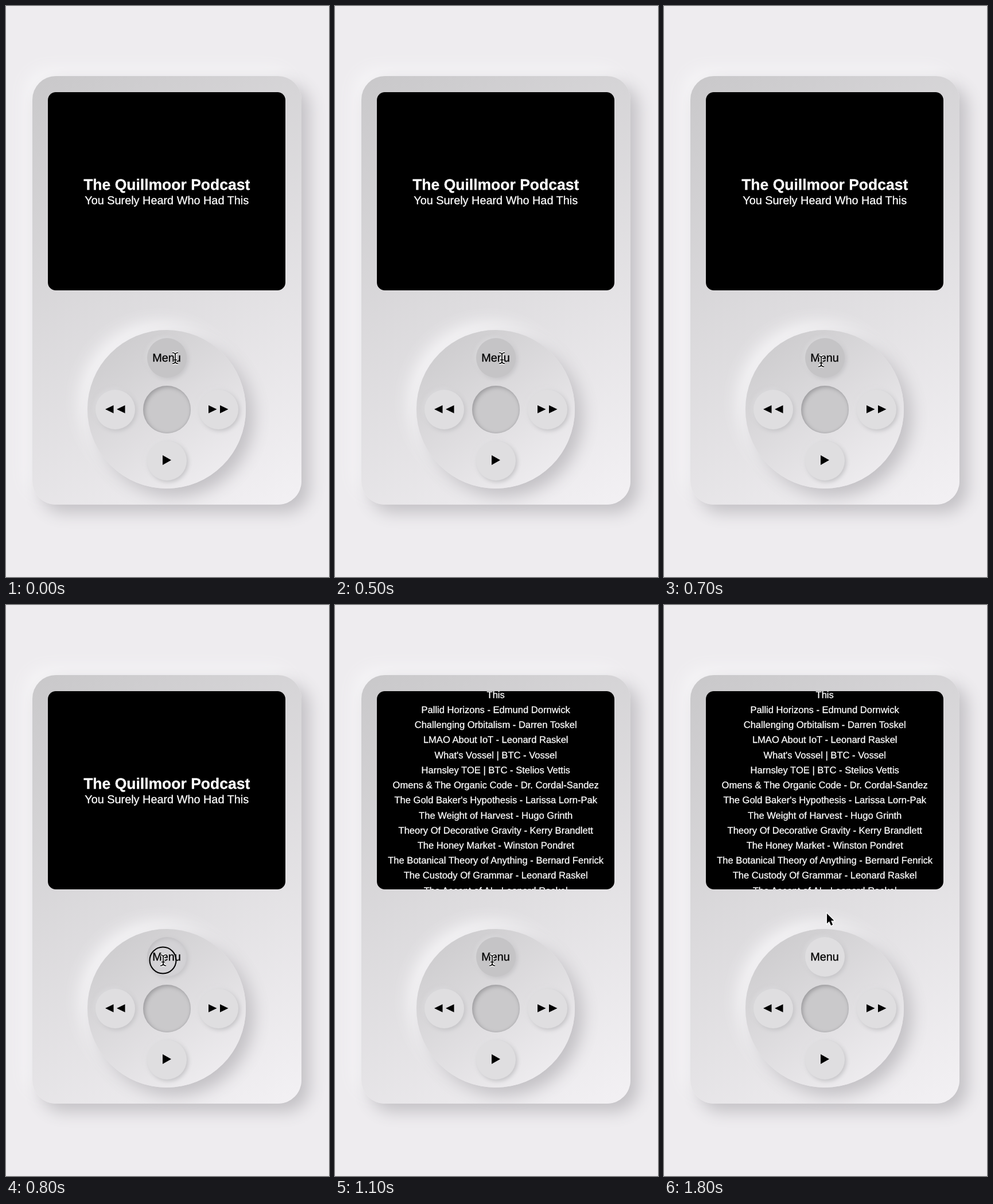
Recreate the animation shown at these times as an HTML page. Size 563 px wide and 994 px high, loop 1900 ms.

```html
<!DOCTYPE html>
<html lang="en">
<head>
<meta charset="utf-8">
<title>Music player</title>
<style>
html, body { margin: 0; width: 100%; height: 100%; overflow: hidden; background: #eeecef; }
div, svg { position: absolute; }
svg { left: 0; top: 0; font-family: "Liberation Sans", Arial, sans-serif; }
text { text-anchor: middle; text-rendering: geometricPrecision; stroke-width: .3px; }
.raised {
  background: linear-gradient(145deg, #c9c8ca, #f3f1f4);
  box-shadow: 13.8px 13.8px 27.6px #c3c1c5, -13.8px -13.8px 27.6px #f5f4f6;
}
#body { left: 46px; top: 122px; width: 469px; height: 746px; border-radius: 41px; }
#screen { left: 73px; top: 150px; width: 414px; height: 345px; border-radius: 13.8px; background: #000; overflow: hidden; }
#screen text { fill: #fff; stroke: #fff; }
#wheel { left: 142px; top: 564px; width: 276px; height: 276px; border-radius: 50%; }
#hub {
  left: 239px; top: 660.5px; width: 83px; height: 83px; border-radius: 50%;
  background: #cac9cb; box-shadow: inset 2.8px 2.8px 7px #9d9c9f, inset -1px -1px 3px #b9b8bb;
}
.key {
  width: 69px; height: 69px; border-radius: 50%; background: #dfdee0;
  box-shadow: 2.8px 2.8px 7px #c6c5c8, -2px -2px 6px #e4e3e580;
}
.key.hover { background: #c5c4c6; }
.key.down { background: #d3d2d5; box-shadow: 2.8px 2.8px 7px #c6c5c8, inset 2.8px 2.8px 7px #c0bfc2; }
</style>
</head>
<body>
<div id="body" class="raised"></div>
<div id="screen">
  <svg width="414" height="345" viewBox="73 150 414 345">
    <g id="title">
      <text x="280.2" y="320" font-size="26.5" font-weight="bold">The Quillmoor Podcast</text>
      <text x="280.2" y="345" font-size="19.87">You Surely Heard Who Had This</text>
    </g>
    <g id="list" font-size="16.56"></g>
  </svg>
</div>
<div id="wheel" class="raised"></div>
<div id="hub"></div>
<div id="menu" class="key" style="left:246px;top:578px"></div>
<div class="key" style="left:156px;top:667.5px"></div>
<div class="key" style="left:335.5px;top:667.5px"></div>
<div class="key" style="left:246px;top:757px"></div>
<svg width="563" height="994">
  <text x="280" y="619" font-size="19.87" stroke="#000">Menu</text>
  <path d="M187.500 695v14l-14.500-7zM207.500 695v14l-14.500-7zM353 695v14l14.500-7zM373 695v14l14.500-7zM273 782v17l15-8.500z"/>
  <circle id="ring" cx="273.500" cy="618.500" r="23" fill="none" stroke="#000" stroke-width="2"/>
  <g id="beam" fill="none">
    <path id="stem" d="M-5-9.500Q-1-9.500 0-6.500Q1-9.500 5-9.500M0-6.500V6.500M-5 9.500Q-1 9.500 0 6.500Q1 9.500 5 9.500M-3 3H3"/>
  </g>
  <path id="arrow" d="M284 537v17.500l4-3.800 3.100 7.200 3-1.300-3-7h5.400z" stroke="#fff" stroke-width="2.400" paint-order="stroke"/>
</svg>
<script>
const $ = id => document.getElementById(id);

const lines = [
  "This",
  "Pallid Horizons - Edmund Dornwick",
  "Challenging Orbitalism - Darren Toskel",
  "LMAO About IoT - Leonard Raskel",
  "What's Vossel | BTC - Vossel",
  "Harnsley TOE | BTC - Stelios Vettis",
  "Omens & The Organic Code - Dr. Cordal-Sandez",
  "The Gold Baker's Hypothesis - Larissa Lorn-Pak",
  "The Weight of Harvest - Hugo Grinth",
  "Theory Of Decorative Gravity - Kerry Brandlett",
  "The Honey Market - Winston Pondret",
  "The Botanical Theory of Anything - Bernard Fenrick",
  "The Custody Of Grammar - Leonard Raskel",
  "The Ascent of AI - Leonard Raskel"
];
lines.forEach((line, i) => {
  const row = document.createElementNS("http://www.w3.org/2000/svg", "text");
  row.setAttribute("x", 280.2);
  row.setAttribute("y", 161.8 + 26.22 * i);
  row.textContent = line;
  $("list").append(row);
});

// The text pointer is a white halo below a thin black stroke
const core = $("stem").cloneNode();
core.removeAttribute("id");
const ink = (path, color, width) => {
  path.setAttribute("stroke", color);
  path.setAttribute("stroke-width", width);
};
ink($("stem"), "#fff", 4.2);
ink(core, "#000", 1.7);
$("beam").append(core);

// Pointer stops: start time, x, y
const stops = [[0, 295, 613], [500, 291, 613], [600, 280, 616.5], [700, 274, 618.5]];
const show = (id, on) => $(id).style.display = on ? "" : "none";

function draw(now) {
  const t = now % 1900;
  const pressed = t >= 800 && t < 900, opened = t >= 900, left = t >= 1800;
  const [, x, y] = stops.findLast(s => t >= s[0]);
  $("beam").setAttribute("transform", `translate(${x} ${y})`);
  show("beam", !left);
  show("arrow", left);
  show("ring", pressed);
  show("title", !opened);
  show("list", opened);
  $("menu").className = "key " + (pressed ? "down" : left ? "" : "hover");
}

const start = performance.now();
function loop() {
  draw(performance.now() - start);
  requestAnimationFrame(loop);
}
loop();
</script>
</body>
</html>
```
